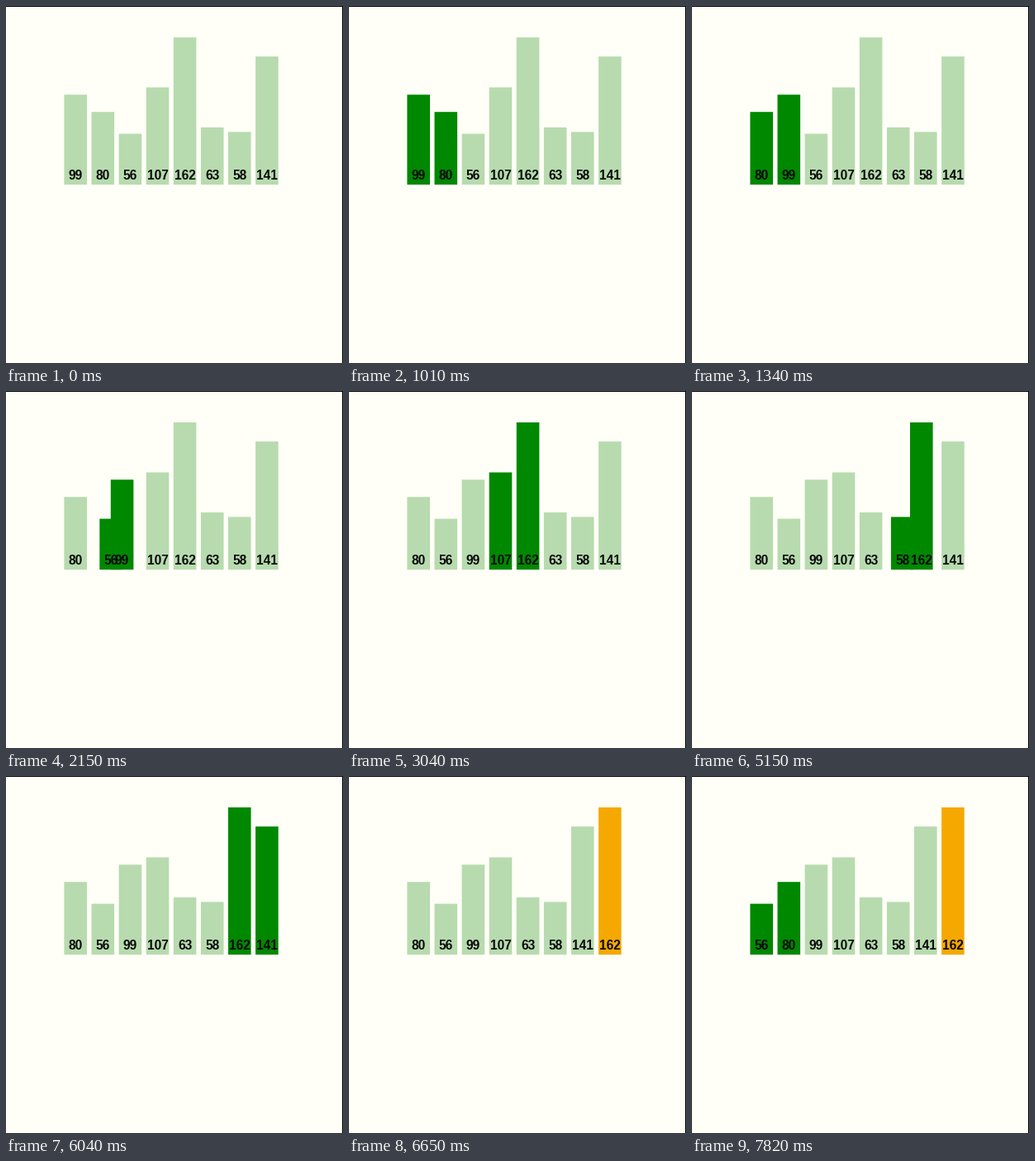
Write a matplotlib script that moves like this. It is 408 px wide and 432 px high and loops after 8 s.

```python
import matplotlib.pyplot as plt
from matplotlib.animation import FuncAnimation
from matplotlib.patches import Rectangle

W, H = 408, 432
LOOP, STEP = 8000, 20

VALUES = [99, 80, 56, 107, 162, 63, 58, 141]
LEFT, PITCH, BAR_W = 70.4, 33.1, 27.6
FLOOR, UNIT = 216.2, 1.1

PAPER, PALE, ACTIVE, DONE = "#fffff8", "#b7dbae", "#008800", "#f5a800"

# (time, left slot of the compared pair); None clears the highlight
COMPARES = [(530, 0), (1540, 1), (2510, 2), (3040, 3), (3530, 4),
            (4540, 5), (5510, 6), (6490, None), (7010, 0)]
# (time, left slot, ms already elapsed at the first visible step)
SWAPS = [(1010, 0, 5), (2030, 1, 25), (4020, 4, 5),
         (5030, 5, 46), (6040, 6, 5), (7540, 0, 5)]
SWAP_MS, HOLD_MS = 250, 40
SORTED_AT, LARGEST = 6490, VALUES.index(max(VALUES))


def cubic_in_out(u):
    u = min(max(u, 0), 1)
    return 4 * u ** 3 if u < 0.5 else 1 - 4 * (1 - u) ** 3


def layout(t):
    """Return the bar in each slot and the x of each bar at time t."""
    order = list(range(len(VALUES)))
    slots = [float(i) for i in order]
    for start, i, lead in SWAPS:
        if t < start:
            break
        elapsed = (t - start) // HOLD_MS * HOLD_MS + lead
        p = cubic_in_out(elapsed / SWAP_MS)
        a, b = order[i], order[i + 1]
        slots[a], slots[b] = i + p, i + 1 - p
        order[i], order[i + 1] = b, a
    return order, [LEFT + PITCH * s for s in slots]


def active_bars(t, order):
    pair = None
    for start, i in COMPARES:
        if t >= start:
            pair = i
    return [] if pair is None else order[pair:pair + 2]


fig = plt.figure(figsize=(W / 72, H / 72), dpi=72, facecolor=PAPER)
ax = fig.add_axes([0, 0, 1, 1])
ax.set_xlim(0, W)
ax.set_ylim(H, 0)
ax.axis("off")

ax.add_patch(Rectangle((0, 0), W, 1, color="black", lw=0))
ax.add_patch(Rectangle((W - 1, 0), 1, H, color="black", lw=0))

bars, labels = [], []
for v in VALUES:
    bar = Rectangle((0, FLOOR - v * UNIT), BAR_W, v * UNIT, lw=0, snap=False)
    bars.append(ax.add_patch(bar))
    labels.append(ax.text(0, 210, str(v), ha="center", va="baseline",
                          family="Liberation Sans", weight="bold",
                          size=15.5, color="#080808", zorder=3))


def update(n):
    t = n * STEP + STEP // 2
    order, xs = layout(t)
    active = active_bars(t, order)
    for k, (bar, label) in enumerate(zip(bars, labels)):
        bar.set_x(xs[k])
        label.set_x(xs[k] + BAR_W / 2)
        if k in active:
            bar.set_facecolor(ACTIVE)
        elif k == LARGEST and t >= SORTED_AT:
            bar.set_facecolor(DONE)
        else:
            bar.set_facecolor(PALE)
    return bars + labels


anim = FuncAnimation(fig, update, frames=LOOP // STEP, interval=STEP,
                     repeat=True)
plt.show()
```
